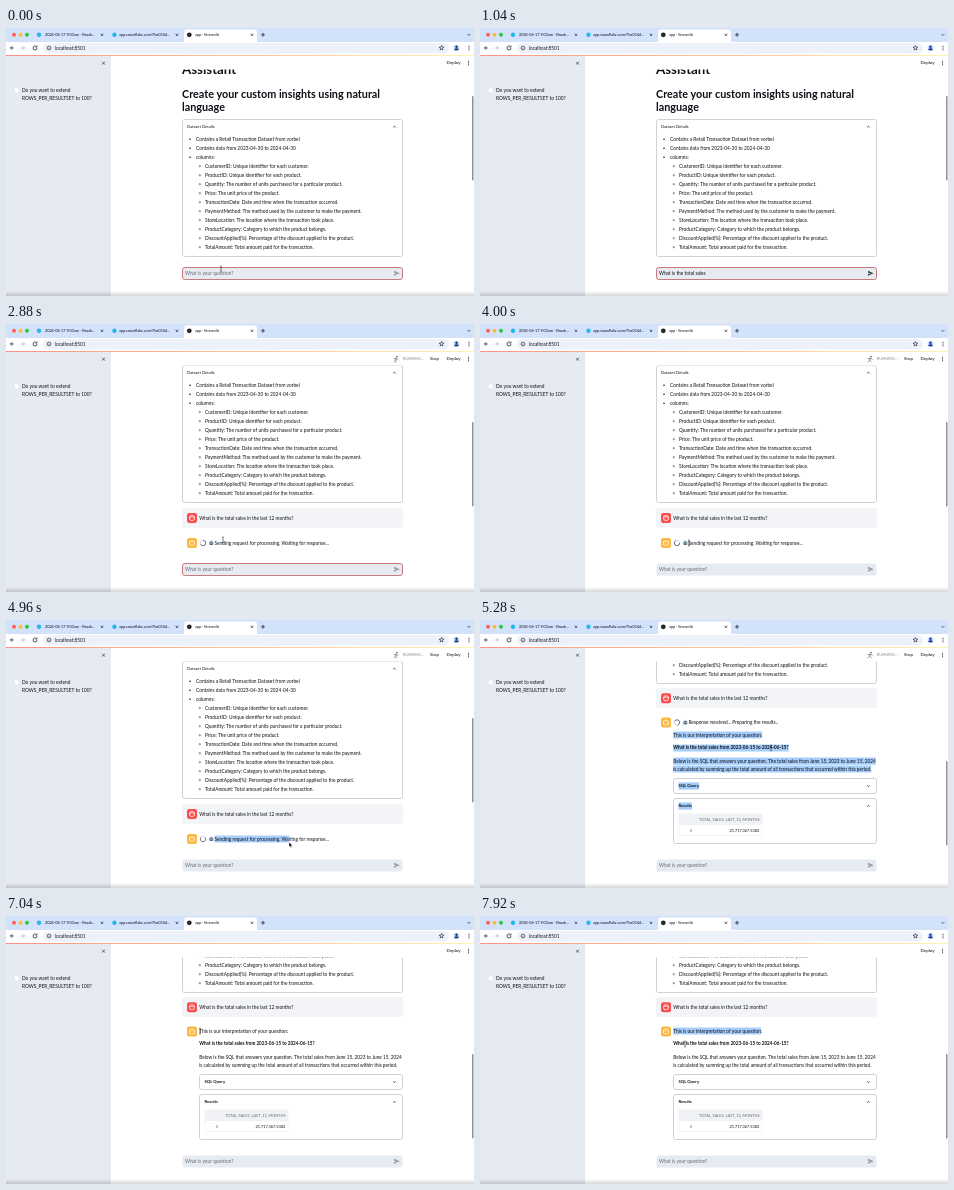
An HTML page with a canvas that plays this animation: 468 px wide and 268 px high, repeating every 8 s.

```html
<!DOCTYPE html>
<html lang="en">
<head>
<meta charset="utf-8">
<title>Assistant</title>
<style>
html, body { margin: 0; width: 100%; height: 100%; overflow: hidden; background: #fff; }
canvas { display: block; width: 468px; height: 268px; }
</style>
</head>
<body>
<canvas id="stage"></canvas>
<script>
const W = 468, H = 268, LOOP = 8000, STEP = 80;
const SUBMIT = 2320, DRAG = 4000, ANSWER = 5120, DONE = 6000, CLEAR = 6400, RESELECT = 7200;
const INK = '#0e1018', MUTED = '#686c77', PANEL = '#e6eaf1', EDGE = '#c4c6cb', RED = '#ff4b4b', MARK = '#a6cdfa';
const QUESTION = 'What is the total sales in the last 12 months?';
const FIELDS = [
  'CustomerID: Unique identifier for each customer.',
  'ProductID: Unique identifier for each product.',
  'Quantity: The number of units purchased for a particular product.',
  'Price: The unit price of the product.',
  'TransactionDate: Date and time when the transaction occurred.',
  'PaymentMethod: The method used by the customer to make the payment.',
  'StoreLocation: The location where the transaction took place.',
  'ProductCategory: Category to which the product belongs.',
  'DiscountApplied(%): Percentage of the discount applied to the product.',
  'TotalAmount: Total amount paid for the transaction.'
];
// Pointer stops: time, x, y
const PATH = [
  [0, 215, 241], [2400, 215, 241], [2880, 217, 216], [3700, 209, 219], [DRAG, 209, 219],
  [4960, 283, 222], [5280, 291, 128], [CLEAR, 196, 116], [7040, 194, 115], [RESELECT, 194, 115],
  [7600, 281, 116], [7920, 205, 128], [LOOP, 205, 128]
];

const canvas = document.getElementById('stage');
const c = canvas.getContext('2d');
const dpr = window.devicePixelRatio || 1;
canvas.width = W * dpr;
canvas.height = H * dpr;

function rect(x, y, w, h, fill, r = 0, stroke, lw = 0.6) {
  c.beginPath();
  c.roundRect(x, y, w, h, r);
  if (fill) { c.fillStyle = fill; c.fill(); }
  if (stroke) { c.strokeStyle = stroke; c.lineWidth = lw; c.stroke(); }
}

function disc(x, y, r, fill, stroke, lw = 0.6) {
  c.beginPath();
  c.arc(x, y, r, 0, Math.PI * 2);
  if (fill) { c.fillStyle = fill; c.fill(); }
  if (stroke) { c.strokeStyle = stroke; c.lineWidth = lw; c.stroke(); }
}

function line(points, color = INK, lw = 0.7) {
  c.beginPath();
  points.forEach(([x, y]) => c.lineTo(x, y));
  c.strokeStyle = color;
  c.lineWidth = lw;
  c.stroke();
}

function setFont(size, weight) {
  c.font = `${weight} ${size}px Lato, "Open Sans", sans-serif`;
}

// y is the middle of the lowercase letters
function text(s, x, y, { size = 4.8, weight = 400, color = INK, align = 'left' } = {}) {
  setFont(size, weight);
  c.textAlign = align;
  c.fillStyle = color;
  c.fillText(s, x, y + size * 0.32);
}

function marked(s, x, y, on, opt = {}) {
  if (on) {
    setFont(opt.size || 4.8, opt.weight || 400);
    rect(x, y - 3.6, c.measureText(s).width, 7.2, MARK);
  }
  text(s, x, y, opt);
}

function cross(x, y, r, color = INK) {
  line([[x - r, y - r], [x + r, y + r]], color, 0.6);
  line([[x + r, y - r], [x - r, y + r]], color, 0.6);
}

function chevron(x, y, up, r = 1.3) {
  const d = up ? r / 2 : -r / 2;
  line([[x - r, y + d], [x, y - d], [x + r, y + d]]);
}

function dots(x, y) {
  for (let i = -1; i <= 1; i++) disc(x, y + i * 1.7, 0.55, INK);
}

function gradient(x0, y0, x1, y1, from, to) {
  const g = c.createLinearGradient(x0, y0, x1, y1);
  g.addColorStop(0, from);
  g.addColorStop(1, to);
  return g;
}

function pointerAt(t) {
  const i = Math.max(1, PATH.findIndex(p => p[0] > t));
  const [a, b] = [PATH[i - 1], PATH[i]];
  const k = (t - a[0]) / (b[0] - a[0]);
  const e = k * k * (3 - 2 * k);
  return [a[1] + (b[1] - a[1]) * e, a[2] + (b[2] - a[2]) * e];
}

function drawBrowser() {
  rect(0, 0, W, 14, '#d3e2fb');
  ['#ff5f57', '#febc2e', '#28c840'].forEach((f, i) => disc(8 + i * 6.5, 6.8, 2, f));
  rect(178, 1.5, 73, 14, '#fff', 3);
  const small = { size: 3.8 };
  disc(33, 6.8, 2.2, '#29b5e8');
  text('2024-06-17 9:03am - Brook…', 39, 6.6, small);
  disc(108.5, 6.8, 2.2, '#29b5e8');
  text('app.snowflake.com/Pos0164…', 113, 6.6, small);
  disc(183.3, 6.8, 2.4, '#24272e');
  text('app · Streamlit', 189, 6.6, small);
  [96, 171, 246].forEach(x => cross(x, 6.8, 1.2));
  line([[255, 6.8], [259, 6.8]]);
  line([[257, 4.8], [257, 8.8]]);
  chevron(463, 6.8, false);

  rect(0, 14, W, 14, '#fff');
  rect(37, 15, 406, 10.4, '#edf2fa', 5.2);
  line([[8, 20], [4.5, 20]]);
  line([[6.1, 18.3], [4.4, 20], [6.1, 21.7]]);
  line([[15, 20], [18.5, 20]], '#a5a9b0');
  line([[16.9, 18.3], [18.6, 20], [16.9, 21.7]], '#a5a9b0');
  c.beginPath();
  c.arc(29, 20, 2, 0, 5.2);
  c.strokeStyle = INK;
  c.lineWidth = 0.7;
  c.stroke();
  line([[31, 17.6], [31, 19.2], [29.4, 19.2]]);
  disc(43, 20, 1.9, null, INK);
  line([[43, 19.7], [43, 21]], INK, 0.5);
  text('localhost:8501', 49, 20, { size: 4.7 });
  const star = [];
  for (let i = 0; i <= 10; i++) {
    const a = i * Math.PI / 5 - Math.PI / 2, r = i % 2 ? 1.1 : 2.4;
    star.push([435.5 + r * Math.cos(a), 20 + r * Math.sin(a)]);
  }
  line(star, INK, 0.6);
  disc(450.5, 20, 3, '#c6dafa');
  disc(450.5, 18.7, 1.2, '#123c86');
  rect(448.4, 20.3, 4.2, 1.9, '#123c86', [1.5, 1.5, 0, 0]);
  dots(463, 20);
  rect(0, 27, W, 1, gradient(0, 0, W, 0, '#ff8f86', '#fff3b0'));
}

function drawSidebar() {
  rect(0, 28, 105, H - 28, PANEL);
  cross(97.5, 35.2, 1.4);
  rect(8.3, 60, 4.8, 4.8, '#fff', 1, '#d9dde4', 0.5);
  text('Do you want to extend', 16, 62.5);
  text('ROWS_PER_RESULTSET to 100?', 16, 70);
}

function drawDetails(dy) {
  text('Assistant', 176, 41.8 + dy, { size: 13.3, weight: 700 });
  text('Create your custom insights using natural', 176, 66.6 + dy, { size: 10.8, weight: 700 });
  text('language', 176, 79.7 + dy, { size: 10.8, weight: 700 });
  rect(176.5, 91.5 + dy, 220, 137, '#fff', 2.2, EDGE, 0.8);
  text('Dataset Details', 181, 98.8 + dy, { size: 4.1 });
  chevron(388.5, 98.8 + dy, true);
  ['Contains a Retail Transaction Dataset from vorbel', 'Contains data from 2023-04-30 to 2024-04-30', 'columns:']
    .forEach((s, i) => {
      disc(184, 111.2 + i * 9 + dy, 0.8, INK);
      text(s, 190, 111 + i * 9 + dy);
    });
  FIELDS.forEach((s, i) => {
    disc(193.8, 138.2 + i * 9 + dy, 0.75, null, INK, 0.4);
    text(s, 199, 138 + i * 9 + dy);
  });
}

function avatar(y, fill) {
  rect(181, y - 5, 10, 10, fill, 2.2);
  if (fill === RED) {
    disc(186, y, 2.6, null, '#fff', 0.8);
    line([[183.6, y - 0.5], [186, y - 1.3], [188.4, y - 0.5]], '#fff', 0.7);
  } else {
    rect(183.4, y - 1.8, 5.2, 4, null, 0.8, '#fff', 0.7);
    line([[186, y - 1.8], [186, y - 3.2]], '#fff', 0.7);
    disc(185, y, 0.4, '#fff');
    disc(187, y, 0.4, '#fff');
  }
}

function spinner(x, y, t) {
  disc(x, y, 2.7, null, '#d3d6dc', 0.8);
  const a = t / 500 * Math.PI * 2;
  c.beginPath();
  c.arc(x, y, 2.7, a, a + 4.2);
  c.strokeStyle = '#555b68';
  c.lineWidth = 0.8;
  c.stroke();
}

function robot(x, y) {
  rect(x - 2, y - 1.6, 4, 3.6, '#5c7488', 1);
  line([[x, y - 1.6], [x, y - 2.7]], '#5c7488', 0.6);
  disc(x - 0.9, y, 0.5, '#d7f0ff');
  disc(x + 0.9, y, 0.5, '#d7f0ff');
}

function drawStatus(t, y, px) {
  spinner(197, y, t);
  robot(205.3, y);
  if (t >= ANSWER) {
    text('Response received... Preparing the results..', 208.5, y);
    return;
  }
  if (t >= DRAG) rect(208.5, y - 3.6, Math.max(0, px - 208.5), 7.2, MARK);
  text('Sending request for processing. Waiting for response...', 208.5, y);
}

function drawAnswer(t, px) {
  const all = t < CLEAR;
  if (t >= RESELECT) {
    const end = t < 7600 ? px : 281;
    rect(193.2, 111.4, end - 193.2, 7.2, MARK);
  }
  marked('This is our interpretation of your question:', 193.2, 115, all);
  marked('What is the total sales from 2023-06-15 to 2024-06-15?', 193.2, 128, all, { weight: 700, size: 4.6 });
  const body = { size: 4.72 };
  marked('Below is the SQL that answers your question. The total sales from June 15, 2023 to June 15, 2024', 193.2, 141.2, all, body);
  marked('is calculated by summing up the total amount of all transactions that occurred within this period.', 193.2, 149, all, body);
  const label = { size: 4.2, weight: 700 };
  rect(193.5, 158.5, 203, 15, '#fff', 2.2, EDGE, 0.8);
  marked('SQL Query', 198.5, 166, all, label);
  chevron(388.5, 166, false);
  rect(193.5, 178.5, 203, 45, '#fff', 2.2, EDGE, 0.8);
  marked('Results', 198.5, 186, all, label);
  chevron(388.5, 186, true);
  rect(199, 194, 83, 10.5, '#f0f2f6');
  rect(199, 194, 83, 21.5, null, 1.2, '#e6e8ed', 0.5);
  line([[199, 204.5], [282, 204.5]], '#e6e8ed', 0.5);
  text('TOTAL_SALES_LAST_12_MONTHS', 279.6, 199.3, { size: 3.9, color: MUTED, align: 'right' });
  text('0', 211, 210.3, { size: 3.9, color: MUTED, align: 'center' });
  text('21,717,367.5382', 279.3, 210.3, { size: 3.9, align: 'right' });
}

function drawChat(t, px) {
  const dy = t < SUBMIT ? 0 : t < ANSWER ? -50 : t < DONE ? -165 : -152;
  drawDetails(dy);
  if (t < SUBMIT) return;
  const row = t < ANSWER ? 194 : 243.3 + dy;
  rect(176, row - 10, 221, 19.7, '#f2f4f7', 2.2);
  avatar(row, RED);
  text(QUESTION, 193.2, row);
  const reply = t < ANSWER ? 219 : t < DONE ? 102.5 : 115.5;
  avatar(reply, '#fdb73e');
  if (t < DONE) drawStatus(t, reply, px);
  if (t >= ANSWER) drawAnswer(t, px);
}

function drawHeader(t) {
  rect(105, 28, W - 105, 13.5, '#fff');
  const small = { size: 4.5 };
  text('Deploy', 440.5, 35, small);
  dots(462.5, 35);
  if (t < SUBMIT || t >= DONE) return;
  const s = Math.sin(t / 80) * 1.4, grey = '#747985';
  disc(391, 32.6, 0.9, grey);
  line([[390.3, 34], [389.6, 36]], grey, 1.1);
  line([[387.4 - s / 2, 38.4], [389.6, 36], [391.7 + s, 38.4]], grey);
  line([[387.6, 34.8], [390.3, 34], [392.6, 35.4 - s / 2]], grey);
  text('RUNNING...', 396.8, 35, { size: 3.9, color: '#8b8f99' });
  text('Stop', 424, 35, small);
}

function drawInput(t) {
  rect(105, 232, W - 105, H - 232, '#fff');
  const focus = t < DRAG;
  rect(176.5, 239.5, 220, 12, PANEL, 2.2, focus ? '#c4585d' : null, 0.8);
  const n = t < SUBMIT ? Math.min(QUESTION.length, Math.max(0, Math.floor((t - 120) / 40))) : 0;
  if (n) text(QUESTION.slice(0, n), 179, 245.2);
  else text('What is your question?', 179, 245.2, { color: MUTED });
  c.beginPath();
  [[388, 242.8], [393.6, 245.3], [388, 247.8], [388, 245.9], [391, 245.3], [388, 244.7]]
    .forEach(([x, y]) => c.lineTo(x, y));
  c.fillStyle = n ? '#3f444f' : '#9297a3';
  c.fill();
}

function drawScrollbar(t) {
  const y = t < SUBMIT ? 68 : t < ANSWER ? 98 : t < DONE ? 141 : 138;
  rect(466, y, 1.5, 84.5, '#8e9095', 0.7);
}

function drawWindowEdge() {
  rect(0, 263, W, 5, gradient(0, 263, 0, H, 'rgba(0,0,0,0)', 'rgba(0,0,0,0.16)'));
}

function drawPointer(t, x, y) {
  if (t >= 160 && t < 2400) return;
  if (t > 4400 && t < ANSWER) {
    c.beginPath();
    [[0, 0], [0, 5], [1.2, 4], [2, 5.8], [2.8, 5.4], [2, 3.7], [3.5, 3.6]]
      .forEach(([a, b]) => c.lineTo(x + a, y + b));
    c.closePath();
    c.fillStyle = '#111';
    c.fill();
    c.strokeStyle = '#fff';
    c.lineWidth = 0.4;
    c.stroke();
    return;
  }
  line([[x, y - 2.5], [x, y + 2.5]], '#222', 0.6);
  line([[x - 1, y - 2.8], [x + 1, y - 2.8]], '#222', 0.5);
  line([[x - 1, y + 2.8], [x + 1, y + 2.8]], '#222', 0.5);
}

function draw(now) {
  const t = Math.floor((now % LOOP) / STEP) * STEP;
  const [px, py] = pointerAt(t);
  c.setTransform(dpr, 0, 0, dpr, 0, 0);
  rect(0, 0, W, H, '#fff');
  drawChat(t, px);
  drawHeader(t);
  drawInput(t);
  drawScrollbar(t);
  drawSidebar();
  drawBrowser();
  drawWindowEdge();
  drawPointer(t, px, py);
}

const start = performance.now();
function tick() {
  draw(performance.now() - start);
  requestAnimationFrame(tick);
}
tick();
</script>
</body>
</html>
```
